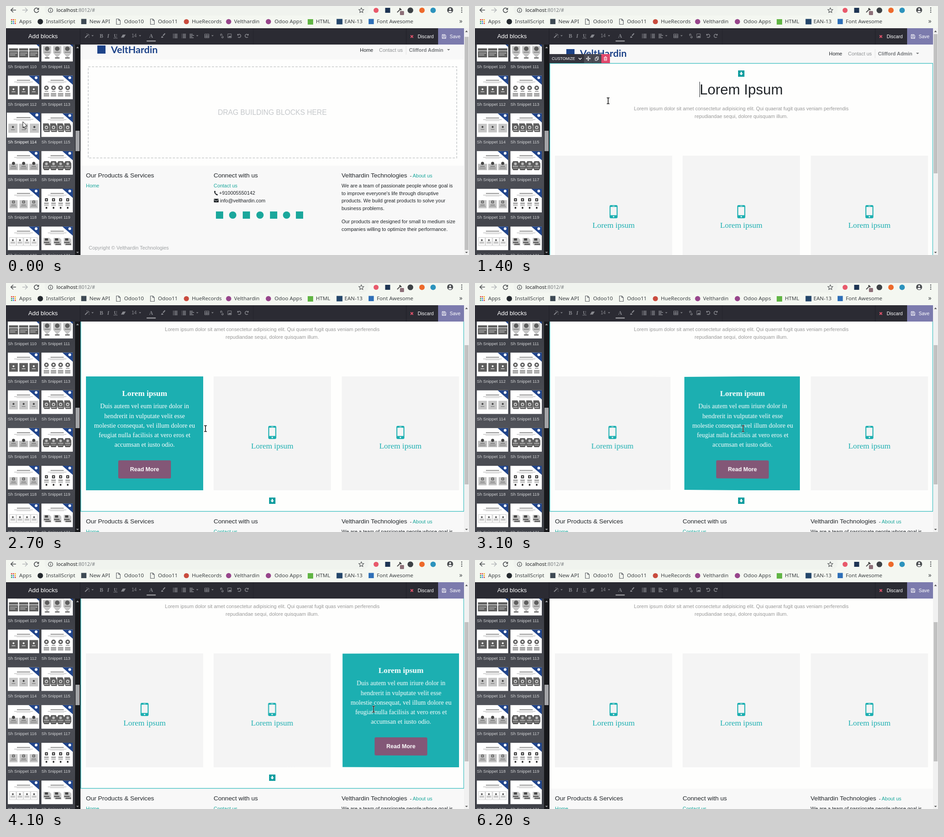
Write an HTML page that moves like this. It is 1019 px wide and 549 px high and loops after 6400 ms.

```html
<!DOCTYPE html>
<html lang="en">
<head>
<meta charset="utf-8">
<title>Website builder</title>
<style>
html, body { margin: 0; width: 100%; height: 100%; overflow: hidden; background: #fefefe; }
body { position: relative; font-family: "Liberation Sans", Arial, sans-serif; }
svg { position: absolute; left: 0; top: 0; display: block; overflow: visible; }
text { white-space: pre; }
.ui { font-family: "Noto Sans", "Open Sans", sans-serif; }
.serif { font-family: "Liberation Serif", serif; }
#view { position: absolute; left: 164px; top: 85px; width: 844px; height: 464px; overflow: hidden; background: #fefefd; }
#page { position: absolute; left: -164px; top: -85px; width: 1019px; height: 1000px; }
.card { position: absolute; top: 330px; width: 258px; height: 251px; overflow: hidden; perspective: 1000px; }
.face { position: absolute; inset: 0; backface-visibility: hidden; transform-origin: 50% 50% 40px; outline: 1px solid transparent; }
.front { background: #f4f4f4; }
.back { background: #1cafb1; }
</style>
</head>
<body>
<svg id="frame" width="1019" height="549"></svg>
<div id="view"><div id="page"><svg id="sheet" width="1019" height="1000"></svg></div></div>
<svg id="top" width="1019" height="549"></svg>
<script>
const LOOP = 6400, STEP = 100, FLIP = 500;
const TEAL = '#1cafb1', LINK = '#1aa79c', INK = '#212529', GREY = '#87888e', DARK = '#5e5e5e', LIGHT = '#c6c6c6';
const BODY = 10.95;
const $ = id => document.getElementById(id);

// SVG helpers
const rect = (x, y, w, h, fill, more = '') => `<rect x="${x}" y="${y}" width="${w}" height="${h}" fill="${fill}" ${more}/>`;
const disc = (x, y, r, fill, more = '') => `<circle cx="${x}" cy="${y}" r="${r}" fill="${fill}" ${more}/>`;
const fillPath = (d, fill, more = '') => `<path d="${d}" fill="${fill}" ${more}/>`;
const line = (d, color, w = 1.4, more = '') => `<path d="${d}" fill="none" stroke="${color}" stroke-width="${w}" ${more}/>`;
const text = (x, y, s, size, fill, more = '') => `<text x="${x}" y="${y}" font-size="${size}" fill="${fill}" ${more}>${s}</text>`;
const mid = 'text-anchor="middle" ', bold = 'font-weight="bold" ';
const caret = (x, y, w, fill) => fillPath(`M${x - w},${y}h${2 * w}l${-w},${w}z`, fill);
const group = (id, body, more = '') => `<g id="${id}" ${more}>${body}</g>`;
const rows = (n, f) => Array.from({ length: n }, (_, i) => f(i)).join('');

// Browser bar
function browser() {
  const ink = '#4c4f52', label = '#3c4043';
  const marks = [[88, 'InstallScript'], [183.5, 'New API'], [260, 'Odoo10'], [334.5, 'Odoo11'], [409, 'HueRecords'],
    [502, 'Velthardin'], [591, 'Odoo Apps'], [682, 'HTML'], [745, 'EAN-13'], [816, 'Font Awesome']];
  const doc = x => line(`M${x - 4},28.5h5l3.5,3.5v8.5h-8.5zM${x + 1},28.5v3.5h3.5`, '#5f6368', 1.2);
  const dots = ['#e0483e', '#e0483e', '#f0b429', '#35a35a', '#3b7ddd', '#f0b429', '#35a35a', '#3b7ddd', '#e0483e'];
  return rect(0, 0, 1019, 49, '#f4f7f1') + rect(85, -8, 713, 29, '#f0f3ee', 'rx="14"') +
    line('M22,9H11M16,4l-5.2,5 5.2,5', ink, 1.6) + line('M36,9h11M42,4l5.2,5 -5.2,5', '#b4b7b9', 1.6) +
    line('M71.5,7A5,5 0 1 0 72,10.5', ink, 1.6) + fillPath('M72.6,3.5v5h-5z', ink) +
    disc(98, 9.5, 4.8, 'none', `stroke="${ink}" stroke-width="1.2"`) + rect(97.4, 8.8, 1.3, 3.4, ink) + rect(97.4, 6.5, 1.3, 1.3, ink) +
    text(111, 13.4, 'localhost<tspan fill="#75797c">:8012/#</tspan>', 10.9, '#202124', 'class="ui"') +
    line('M782,4l1.6,3.6 3.9,.4 -2.9,2.6 .8,3.9 -3.4,-2 -3.4,2 .8,-3.9 -2.9,-2.6 3.9,-.4z', ink, 1.1) +
    disc(814.5, 9.5, 5.5, '#e8596b') + rect(834.5, 4, 11, 11, '#1d3453') +
    line('M861,14l7,-7', '#555', 2.2) + line('M866,5l4,4', '#444', 3) + rect(867, 11, 9, 9, '#8d6f78', 'rx="1.5"') +
    disc(890, 9.5, 6.3, '#3d4246') + disc(915.5, 9.5, 6, '#ed6a2c') + disc(940, 9.5, 6, '#2c93bd') +
    disc(977.5, 9, 6.6, ink) + disc(977.5, 7, 2.1, '#fff') + fillPath('M973.3,12.6q4.2,-4 8.4,0q-4.2,3.6 -8.4,0z', '#fff') +
    rows(3, i => disc(1003, 4.5 + i * 4.5, 1.3, ink)) +
    rows(9, i => rect(11 + i % 3 * 4, 29 + Math.floor(i / 3) * 4, 2.6, 2.6, dots[i])) +
    text(29, 38.4, 'Apps', 11.6, label, 'class="ui"') +
    disc(75.5, 34.5, 6, '#24292e') + rect(165.5, 28.5, 11.5, 11.5, '#3e4a54') + doc(247) + doc(322) +
    disc(397, 34.5, 5.6, '#c94b3d') + disc(490, 34.5, 5.8, '#97458b') + disc(577.5, 34.5, 5.8, '#97458b') +
    rect(664, 29, 12, 12, '#61b544') + rect(727.5, 28.5, 13, 12, '#24466a') + rect(798, 28.5, 11.5, 11.5, '#2e6fb7') +
    marks.map(([x, s]) => text(x, 38.4, s, 11.6, label, 'class="ui"')).join('') +
    text(1001, 38.4, '»', 14, label, mid + 'class="ui"');
}

// Editor tool bar
function toolbar() {
  const bars = (x, ws) => ws.map((w, i) => rect(x, 61.5 + i * 2.6, w, 1.5, GREY)).join('');
  return rect(0, 49, 1008, 36, '#2b2b33') + rect(162.5, 49, 1, 36, '#1f1f26') + rect(543.5, 49, 1, 36, '#25252c') + rect(880.5, 49, 1, 36, '#1f1f26') +
    text(81.5, 70.6, 'Add blocks', 13.3, '#fff', mid) +
    line('M174,70l6,-6', GREY, 2) + line('M181,61v3M184,64h-3M177,61.5h2M183,67.5v2', GREY, 1) + caret(190.5, 64.5, 2.5, GREY) +
    text(210, 70, 'B', 11.5, GREY, mid + bold + 'class="serif"') + text(225, 70, 'I', 11.5, GREY, mid + bold + 'font-style="italic" class="serif"') +
    text(241, 69, 'U', 10, GREY, mid + bold + 'class="serif"') + rect(236.5, 70.3, 9, 1, GREY) +
    fillPath('M253,69.5l4,-6.5h6.5l-4,6.5z', GREY) +
    text(282, 69.2, '14', 10, GREY, mid) + caret(295, 64.5, 2.5, GREY) +
    text(319.5, 69.6, 'A', 11.5, GREY, mid + bold + 'class="serif"') + rect(309.5, 76, 20, 2.4, '#9a9a9e') +
    line('M350,60.5l-4.5,5', GREY, 2.4) + fillPath('M341,69.5q1.5,-.5 2,-3.5l3.5,2.5q-1.5,2.5 -5.5,1z', GREY) +
    bars(370.5, [7, 7, 7, 7]) + bars(367.5, [1.8, 1.8, 1.8, 1.8]) + bars(389, [7, 7, 7, 7]) + bars(386.5, [1, 1, 1, 1]) +
    bars(404, [7, 10, 6, 9]) + caret(421, 64.5, 2.5, GREY) +
    line('M437.5,62h9v8h-9zM437.5,65.5h9M437.5,67.8h9M442,62v8', GREY, 1.1) + caret(454.5, 64.5, 2.5, GREY) +
    line('M474,66l-1.8,-1.8a1.8,1.8 0 0 1 2,-2.4l2,2M475.5,65.5l2.5,2.3a1.7,1.7 0 0 1 -2.3,2.3l-1.8,-1.8', GREY, 1.3) +
    line('M488,61.5h8v8.5h-8z', GREY, 1) + fillPath('M489,69l2.5,-3.5 1.5,1.5 1.5,-2 1,4z', GREY) +
    line('M510.5,63.5a3.6,3.6 0 1 1 0,4.8', GREY, 1.5) + fillPath('M509,61v4h4z', GREY) +
    line('M532.5,63.5a3.6,3.6 0 1 0 0,4.8', GREY, 1.5) + fillPath('M534,61v4h-4z', GREY) +
    line('M890.5,64.5l5.5,5.5M896,64.5l-5.5,5.5', '#e0546c', 2) + text(906, 71, 'Discard', 10.4, '#fff') +
    rect(951, 49, 57, 36, '#7c7bad') + line('M960,63h6l2,2v6.5h-8zM962,63v2.5h3.5v-2.5M962,71v-3h4v3', '#fff', 1) +
    text(976.5, 71, 'Save', 10.4, '#fff');
}

// Sidebar thumbnails: [columns, drawing around centre c]
const bar = (x, y, w, f = DARK, h = 1.2) => rect(x, y, w, h, f);
const kinds = [
  [3, c => rect(c - 10, 23, 20, 20, DARK) + bar(c - 10, 28, 20, '#fff') + bar(c - 8, 33, 16, '#d8d8d8') + bar(c - 8, 37, 12, '#d8d8d8')],
  [3, c => fillPath(`M${c - 9},18h18v15l-9,11l-9,-11z`, LIGHT) + disc(c, 24, 5, DARK) + bar(c - 6, 31, 12) + bar(c - 5, 43, 10, DARK, 2.4)],
  [3, c => rect(c - 9.5, 23, 19, 19, DARK) + disc(c, 30, 2, '#fff') + bar(c - 4, 35, 8, '#eee')],
  [4, c => disc(c, 27, 3.6, '#fff', `stroke="${DARK}" stroke-width="3"`) + bar(c - 4, 34, 8) + rows(3, i => bar(c - 6, 38.5 + i * 2.8, 12, '#777', 1.6))],
  [3, c => rect(c - 9.5, 23, 19, 19, LIGHT) + disc(c, 30, 2.1, '#444') + bar(c - 4, 35, 8, '#777')],
  [4, c => fillPath(`M${c - 7.5},22h12l3,6v13h-12l-3,-5z`, DARK) + disc(c, 31, 3.6, '#ddd') + disc(c, 31, 2, DARK) + bar(c - 5, 37, 10, '#ddd')],
  [3, c => rect(c - 10, 28, 20, 14, '#bdbdbd') + disc(c, 27, 3.4, '#444') + bar(c - 5, 33, 10) + bar(c - 7, 36, 14, '#888') + bar(c - 7, 38.5, 14, '#888')],
  [4, c => fillPath(`M${c - 5},22h10l3,5v10l-3,5h-10l-3,-5v-10z`, DARK) + disc(c, 28, 3, '#bbb') + bar(c - 6, 33, 12, '#ddd') + bar(c - 5, 37, 10, '#aaa')],
  [3, c => rect(c - 9, 25, 18, 18, LIGHT) + rect(c - 3, 26, 6, 6, DARK) + disc(c, 29, 1.2, '#fff') + bar(c - 5, 35, 10) + bar(c - 7, 38, 14, '#888')],
  [4, c => rect(c - 3.2, 21, 6.4, 6.4, '#222') + disc(c, 24.2, 1.5, '#fff') + bar(c - 5, 31, 10, '#333') + bar(c - 5, 34, 10, '#999') + bar(c - 5, 36.5, 10, '#999') + disc(c, 42, 2, '#222')],
  [4, c => rect(c - 7, 24, 14, 18, '#fff', 'stroke="#bbb" stroke-width=".8"') + disc(c, 30, 2.1, DARK) + bar(c - 5, 34, 10, '#777') + bar(c - 5, 37, 10, '#aaa')],
  [3, c => fillPath(`M${c - 8},25h13l4,4v13h-13l-4,-4z`, LIGHT) + rect(c - 5, 26, 7, 5, '#444') + bar(c - 7, 34, 12, '#333', 1.8) + bar(c - 4, 38, 12, '#333', 1.8)]
];
const spot = i => [4 + i % 2 * 74, 70.3 + Math.floor(i / 2) * 83.2];
function thumb(i) {
  const [n, draw] = kinds[i];
  return rect(0, 0, 69, 52, '#fff') + bar(20, 9.4, 29, '#777', 1.6) + bar(14, 13.4, 41, '#aaa', 1) + bar(19, 15.8, 31, '#bbb', .8) +
    rows(n, k => draw(n === 3 ? 12.5 + k * 22.3 : 11 + k * 15.6)) +
    fillPath('M46,0h23v20z', '#21458b') + disc(62.3, 4.8, 3, '#fff');
}
function sidebar() {
  return '<defs><linearGradient id="shade" x1="0" y1="0" x2="0" y2="1"><stop offset="0" stop-color="#3a3c43"/><stop offset=".5" stop-color="#505259"/><stop offset="1" stop-color="#3f4148"/></linearGradient></defs>' +
    rect(0, 85, 164, 464, 'url(#shade)') +
    rows(12, i => {
      const [x, y] = spot(i);
      return group('thumb' + i, thumb(i), `transform="translate(${x} ${y})"`) +
        text(x, y + 66.3, 'Sh Snippet ' + (110 + i), 9.4, '#d3d4d6', `id="label${i}"`);
    }) +
    rect(152, 85, 11, 464, '#18191c') + rect(153, 275, 9, 45, '#a3a4a7') +
    fillPath('M154.5,93h6l-3,-3.5z', '#a3a4a7') + caret(157.5, 542, 3, '#a3a4a7') + rect(163, 85, 1, 464, '#26272c');
}

function scrollbar() {
  return rect(1008, 49, 11, 500, '#f1f1f1') + fillPath('M1010.5,57.5h6l-3,-3.5z', '#555') + caret(1013.5, 542, 3, '#555') +
    rect(1009.5, 68, 8.5, 470, '#c1c1c1', 'id="knob"');
}

// Page content, drawn unscrolled
function sheet() {
  const arrowBox = y => rect(579, y - 7, 14, 14, '#109d9f') + fillPath(`M584.7,${y - 4}h2.6v3.6h2.7l-4,4.2l-4,-4.2h2.7z`, '#fff');
  const about = ['We are a team of passionate people whose goal is', "to improve everyone's life through disruptive", 'products. We build great products to solve your', 'business problems.'];
  const more = ['Our products are designed for small to medium size', 'companies willing to optimize their performance.'];
  const header = rect(164, 85, 844, 41, '#f8f8f8') + rect(201, 95, 18, 18, '#1d4389') +
    text(231, 112, 'VeltHardin', 21.5, '#1d4389', bold + 'style="font-family:Lato,sans-serif"') +
    text(779, 108.6, 'Home', BODY, INK) + text(821, 108.6, 'Contact us', BODY, '#8d9092') + rect(880, 95, 1, 20, '#e2e2e2') +
    text(887, 108.6, 'Clifford Admin', BODY, '#75787b', bold) + caret(974, 103, 3.3, '#75787b');
  const drop = rect(181, 142, 811, 201, 'none', 'stroke="#c9cbcd" stroke-width="1.6" stroke-dasharray="5 3"') +
    text(586, 248.4, 'DRAG BUILDING BLOCKS HERE', 15.7, '#c5c8cb', mid);
  const block = text(586, 194.6, 'Lorem Ipsum', 31.4, INK, mid) +
    text(586, 230, 'Lorem ipsum dolor sit amet consectetur adipisicing elit. Qui quaerat fugit quas veniam perferendis', BODY, '#999', mid) +
    text(586, 246.7, 'repudiandae sequi, dolore quisquam illum.', BODY, '#999', mid);
  const footer = rect(164, 360, 844, 400, '#f8f8f8') +
    text(176, 385.8, 'Our Products &amp; Services', 13.7, INK) + text(457, 385.8, 'Connect with us', 13.7, INK) +
    text(738.5, 385.8, 'Velthardin Technologies', 13.7, INK) + text(889, 385.8, '- <tspan fill="' + LINK + '">About us</tspan>', BODY, INK) +
    text(176, 408, 'Home', BODY, LINK) + text(457, 408, 'Contact us', BODY, LINK) +
    line('M459,416.5q.5,6.5 6.5,8', INK, 2) + line('M459,416l1.6,2.6M463,423l2.6,1.6', INK, 2.6) + text(469, 424.4, '+910005550142', BODY, INK) +
    rect(457.5, 433, 10.5, 8, INK, 'rx="1"') + line('M457.5,434.5l5.2,3.6l5.3,-3.6', '#f8f8f8', .9) + text(471, 441, 'info@velthardin.com', BODY, INK) +
    [470, 499, 529, 559, 589, 617.5, 646].map((x, i) => i % 2 ? disc(x, 469, 8, LINK) : rect(x - 8, 461, 16, 16, LINK)).join('') +
    about.map((s, i) => text(738.5, 408 + i * 16.5, s, BODY, INK)).join('') +
    more.map((s, i) => text(738.5, 487 + i * 16.5, s, BODY, INK)).join('') +
    text(182, 545, 'Copyright © Velthardin Technologies', BODY, '#9fa2a4');
  const frame = rect(164.7, 126.5, 842.8, 501, 'none', 'stroke="#35bcbe" stroke-width="1.3"') + arrowBox(149) + arrowBox(604) +
    rect(164, 106, 114, 20, '#34343d') + rect(240, 106, 18.5, 20, '#4b4c55') + rect(259, 106, 18.5, 20, '#4b4c55') + rect(278, 106, 19, 20, '#e2486c') +
    text(169, 119.4, 'CUSTOMIZE', 8.75, '#fff') + line('M228,114.5l3.3,3.3l3.3,-3.3', '#fff', 1.5) +
    line('M245.3,116h8M249.3,112v8', '#fff', 1.2) + fillPath('M249.3,110.8l2,2.4h-4zM249.3,121.2l2,-2.4h-4zM244.1,116l2.4,-2v4zM254.5,116l-2.4,-2v4z', '#fff') +
    line('M264.5,114.5h4.5v5.5h-4.5zM267,114v-2h4.5v6h-2', '#fff', 1) +
    line('M283.7,113.5h7M284.5,114v6h5.4v-6M286,113v-1.3h2.4v1.3M286.3,115.5v3M288.2,115.5v3', '#fff', 1);
  return header + group('drop', drop) + group('block', block) + group('footer', footer) + group('outline', frame) +
    rect(494, 167, 1, 34, INK, 'id="caret"');
}

function addCards() {
  const words = ['Duis autem vel eum iriure dolor in', 'hendrerit in vulputate velit esse', 'molestie consequat, vel illum dolore eu', 'feugiat nulla facilisis at vero eros et', 'accumsan et iusto odio.'];
  const serif = mid + 'class="serif" ';
  const front = rect(120.2, 109, 17.6, 29, TEAL, 'rx="3"') + rect(122.3, 113, 13.4, 18.3, '#f4f4f4') + rect(126.5, 110.6, 5, 1, '#f4f4f4') + disc(129, 134.6, 1.6, '#f4f4f4') +
    text(129, 158.6, 'Lorem ipsum', 17.4, TEAL, serif);
  const back = text(129, 43, 'Lorem ipsum', 17.3, '#fff', serif + bold) +
    words.map((s, i) => text(129, 70.4 + i * 21.2, s, 14.15, '#fff', serif)).join('') +
    rect(71, 185, 116, 40, '#835777', 'rx="3"') + text(129, 209.4, 'Read More', 12.5, '#fff', mid + bold);
  return [176, 457, 738.5].map(x => {
    const card = document.createElement('div');
    card.className = 'card';
    card.style.left = x + 'px';
    card.innerHTML = [['front', front], ['back', back]].map(([c, s]) => `<div class="face ${c}"><svg width="258" height="251">${s}</svg></div>`).join('');
    $('page').append(card);
    return card;
  });
}

// Pointers, hot spot at 0,0
const edge = 'stroke="#111" stroke-width="1" stroke-linejoin="round"';
const beam = 'M-3,-6.5h2.2l.8,.7l.8,-.7h2.2M-3,6.5h2.2l.8,-.7l.8,.7h2.2M0,-6v12';
const pointers = {
  arrow: fillPath('M0,0v13.5l3,-2.8l2.3,5.3l2.4,-1l-2.3,-5.2h4.2z', '#fff', edge),
  hand: fillPath('M-3,7l-4,-5.5q0,-2 2,-1.4l1.6,1.6l-1.6,-6q1,-2 2.2,-.2l1.2,3.4l-.2,-5q1.4,-1.7 2.5,0l.4,5l1,-4.4q1.5,-1.3 2.3,.3l-.5,5l1.4,-2.8q1.7,-.9 1.8,1l-2,6l-.8,3z', '#fff', edge),
  beam: line(beam, '#fff', 2.6) + line(beam, '#1a1a1a', 1.6)
};
const route = [[0, 37, 255], [100, 38, 263], [400, 38, 263], [1000, 462, 256], [1100, 462, 256], [1200, 293, 209], [1700, 293, 209],
  [2200, 424, 321], [2600, 424, 321], [2700, 439, 321], [3000, 590, 321], [3300, 590, 321], [3400, 612, 322], [3700, 770, 327],
  [3900, 809, 329], [4300, 809, 329], [4400, 796, 281], [4500, 796, 281], [4700, 420, 150], [4800, 120, 42], [4900, 30, 140],
  [5000, 12, 200], [5300, 12, 200], [5500, 6, 152], [5600, 6, 152], [6100, 96, 11]];
const hovers = [[1700, 2700], [2700, 3640], [3670, 4500]];

const bez = (s, p, q) => 3 * (1 - s) ** 2 * s * p + 3 * (1 - s) * s * s * q + s ** 3;
function ease(x) {
  if (x <= 0 || x >= 1) return x <= 0 ? 0 : 1;
  let lo = 0, hi = 1;
  for (let i = 0; i < 24; i++) {
    const m = (lo + hi) / 2;
    if (bez(m, .4, .2) < x) lo = m; else hi = m;
  }
  return bez(lo, .2, 1);
}
function along(t) {
  const k = route.findIndex(p => p[0] > t);
  if (k < 0) return route[route.length - 1].slice(1);
  const [t0, x0, y0] = route[k - 1], [t1, x1, y1] = route[k], u = (t - t0) / (t1 - t0);
  return [x0 + (x1 - x0) * u, y0 + (y1 - y0) * u];
}

$('frame').innerHTML = sidebar() + browser() + toolbar() + scrollbar();
$('sheet').innerHTML = sheet();
$('top').innerHTML = group('ghost', thumb(4), 'opacity=".9"') + Object.keys(pointers).map(k => group(k, pointers[k])).join('');
const cards = addCards();

const show = (id, on) => { $(id).style.display = on ? '' : 'none'; };
const move = (id, x, y, s = 1) => $(id).setAttribute('transform', `translate(${x} ${y}) scale(${s})`);
function hover(i, on) {
  const [x, y] = spot(i);
  move('thumb' + i, x - (on ? 2 : 0), y - (on ? 1.6 : 0), on ? 1.058 : 1);
  $('label' + i).setAttribute('fill', on ? '#fff' : '#d3d4d6');
}

function draw(t) {
  const placed = t >= 1000, u = Math.min(1, Math.max(0, (t - 1400) / 200));
  const scroll = placed ? 124 * u * u * (3 - 2 * u) : 8;
  $('page').style.transform = `translateY(${-scroll}px)`;
  $('knob').setAttribute('y', placed ? 62 + scroll * .605 : 68);
  $('knob').setAttribute('height', placed ? 307 : 470);
  show('drop', !placed);
  show('block', placed);
  move('footer', 0, placed ? 268 : 0);
  show('outline', t >= 1100 && t < 5200);
  show('caret', t >= 1400 && t < 1900);

  cards.forEach((card, i) => {
    const [from, to] = hovers[i], p = ease((t - from) / FLIP) - ease((t - to) / FLIP);
    card.style.display = placed ? '' : 'none';
    card.children[0].style.transform = `rotateY(${180 * p}deg)`;
    card.children[1].style.transform = `rotateY(${180 * p - 180}deg)`;
  });

  const [x, y] = along(t);
  const kind = t < 100 || t >= 5500 ? 'arrow' : t < 1000 || t >= 4800 ? 'hand' : 'beam';
  for (const k in pointers) show(k, k === kind && t < 6200);
  move(kind, x, y);
  show('ghost', t >= 500 && t < 1000);
  move('ghost', x - 34, y - 27);
  hover(4, t < 500);
  hover(2, t >= 5000 && t < 5500);
}

let start;
function tick(now) {
  start ??= now;
  draw(Math.floor((now - start) % LOOP / STEP) * STEP);
  requestAnimationFrame(tick);
}
draw(0);
requestAnimationFrame(tick);
</script>
</body>
</html>
```
